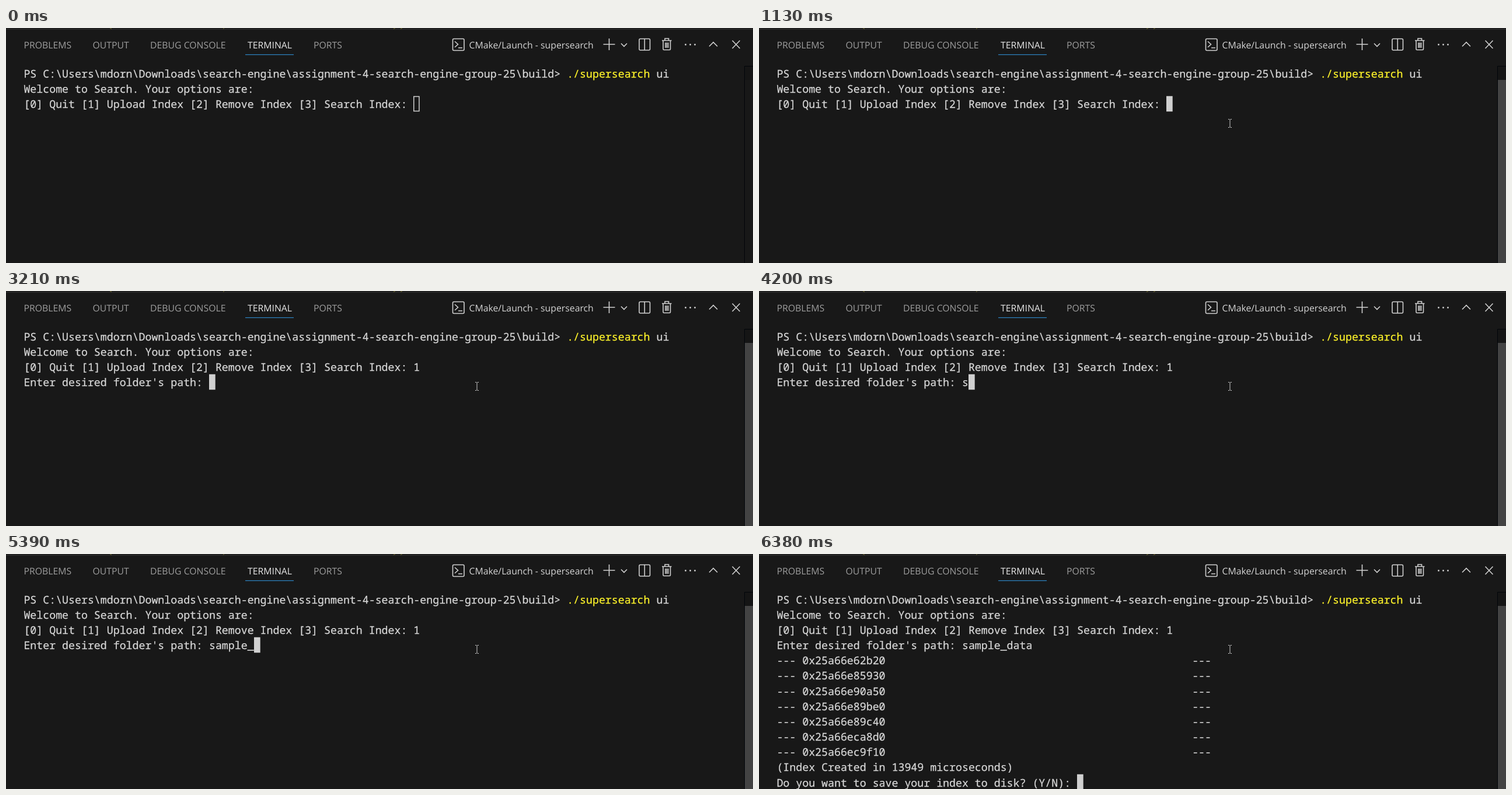
An HTML page that plays this animation: 1280 px wide and 403 px high, repeating every 8 s.

```html
<!DOCTYPE html>
<html lang="en">
<head>
<meta charset="utf-8">
<title>Terminal session</title>
<style>
  html, body { margin: 0; width: 100%; height: 100%; overflow: hidden; background: #181818; }
  svg { display: block; }
  text { white-space: pre; text-rendering: geometricPrecision; }
  .tabs { font: 15.8px "Open Sans", "Noto Sans", sans-serif; fill: #9d9d9d; }
  .tabs .on { fill: #e7e7e7; }
  .tabs .title { fill: #d4d4d4; }
  .icons { fill: none; stroke: #d0d0d0; stroke-width: 1.6; }
  #term { font: 18.25px "Noto Sans Mono", "DejaVu Sans Mono", monospace; font-variant-ligatures: none; fill: #d8d8d8; stroke: #d8d8d8; stroke-width: 0.25; }
  #term .cmd { fill: #fdf32a; stroke: #fdf32a; }
</style>
</head>
<body>
<svg width="1280" height="403" viewBox="0 0 1280 403">
  <rect width="1280" height="403" fill="#181818"/>
  <rect width="1280" height="2" fill="#1f1f1f"/>
  <rect y="2" width="1280" height="1" fill="#2b2b2b"/>
  <path d="M178 0l3 1.5M374 0l-2 1.5M667 0l-3 1.5M679 0l-3 1.5" stroke="#77702f"/>

  <g class="tabs">
    <text x="30.5" y="35.3">PROBLEMS</text>
    <text x="148.5" y="35.3">OUTPUT</text>
    <text x="247" y="35.3">DEBUG CONSOLE</text>
    <text x="414" y="35.3" class="on">TERMINAL</text>
    <text x="527" y="35.3">PORTS</text>
    <text x="793.5" y="35.3" class="title">CMake/Launch - supersearch</text>
  </g>
  <rect x="410" y="45" width="83" height="1.3" fill="#2b7db8"/>

  <g class="icons">
    <rect x="765.5" y="18.5" width="19.5" height="20" rx="2"/>
    <path d="M769 23l5.5 5-5.5 5M775 34h7"/>
    <path d="M1023.5 28h20M1033.5 18v20M1054 26.5l5 5 5-5"/>
    <rect x="1085" y="18.5" width="18.5" height="19.5" rx="2"/>
    <path d="M1094.25 18.5v19.5"/>
    <path d="M1124 21.5h16.5M1129 21v-3h6.5v3M1126 22v14q0 1.5 1.5 1.5h9.5q1.5 0 1.5-1.5v-14M1130 25v9M1132.3 25v9M1134.6 25v9"/>
    <path d="M1205 31.5l7-7 7 7M1244.5 21.5l13 13.5M1257.5 21.5l-13 13.5"/>
    <path d="M1164.5 28.5h0M1172.5 28.5h0M1180.5 28.5h0" stroke-width="2.8" stroke-linecap="round"/>
  </g>

  <rect x="1266" y="65" width="14" height="24" fill="#151515"/>
  <path d="M1265.5 403V65.5H1280" fill="none" stroke="#010409"/>
  <rect id="slider" x="1266" y="89" width="14" height="314" fill="#434343"/>

  <g id="term"></g>
  <rect id="caret" stroke="#d0d0d0" stroke-width="1.5"/>
  <path id="mouse" d="M-3-7h2l1 1 1-1h2M0-6v12M-3 7h2l1-1 1 1h2" fill="none" stroke="#ccc"/>
</svg>
<script>
const LOOP = 8000, LEFT = 30.4, COL = 10.95, TOP = 84.7, ROW = 26.15;
const $ = id => document.getElementById(id);

const path = 'PS C:\\Users\\mdorn\\Downloads\\search-engine\\assignment-4-search-engine-group-25\\build> ';
const menu = '[0] Quit [1] Upload Index [2] Remove Index [3] Search Index: ';
const prompt = "Enter desired folder's path: ";
const folder = 'sample_data';
const keyTimes = [4200, 4400, 4500, 4600, 4700, 4800, 5390, 5590, 5790, 5885, 5980];
const report = [
  ...['62b20', '85930', '90a50', '89be0', '89c40', 'ca8d0', 'c9f10']
    .map((id, i) => ('--- 0x25a66e' + id).padEnd(65) + '---'),
  '(Index Created in 13949 microseconds)',
  'Do you want to save your index to disk? (Y/N): '
];

// Pointer route: time, x, y
const route = [[130, 1240, 396], [260, 1163, 372], [395, 1034, 328], [530, 926, 272],
  [665, 845, 200], [800, 808, 166], [930, 813, 167], [1000, 807, 163]];

function pointerAt(t) {
  if (t >= 1000) return [807, 163];
  const s = 130 + Math.floor((Math.min(t, 930) - 130) / 66.6) * 66.6;
  const i = Math.max(1, route.findIndex(p => p[0] > s));
  const [a, b] = [route[i - 1], route[i]];
  const k = (s - a[0]) / (b[0] - a[0]);
  return [1, 2].map(n => a[n] + (b[n] - a[n]) * k);
}

function linesAt(t) {
  const lines = [path, 'Welcome to Search. Your options are:', menu + (t >= 2990 ? '1' : '')];
  if (t >= 3210) lines.push(prompt + folder.slice(0, keyTimes.filter(k => t >= k).length));
  if (t >= 6380) lines.push(...report);
  return lines;
}

function set(el, attrs) {
  for (const name in attrs) el.setAttribute(name, attrs[name]);
}

let shown = '';
function drawLines(lines) {
  const key = lines.join('\n');
  if (key === shown) return;
  shown = key;
  $('term').innerHTML = lines.map((line, i) =>
    `<text x="${LEFT}" y="${TOP + i * ROW}">${line.replace('>', '&gt;')}` +
    (i ? '' : '<tspan class="cmd">./supersearch</tspan> ui') + '</text>').join('');
}

function draw(now) {
  const t = now % LOOP;
  const lines = linesAt(t), last = lines.length - 1;
  drawLines(lines);
  const focused = t >= 1130;
  set($('caret'), {
    x: Math.round(LEFT + lines[last].length * COL) + 0.75,
    y: Math.round(TOP + last * ROW - 20.2) + 0.5,
    width: 9.2, height: 25, fill: focused ? '#d0d0d0' : 'none'
  });
  const entered = t >= 130;
  set($('slider'), { opacity: entered ? 1 : 0 });
  const [x, y] = entered ? pointerAt(t) : [0, 0];
  set($('mouse'), { opacity: entered ? 1 : 0, transform: `translate(${x} ${y + 0.5})` });
  requestAnimationFrame(draw);
}
requestAnimationFrame(draw);
</script>
</body>
</html>
```
